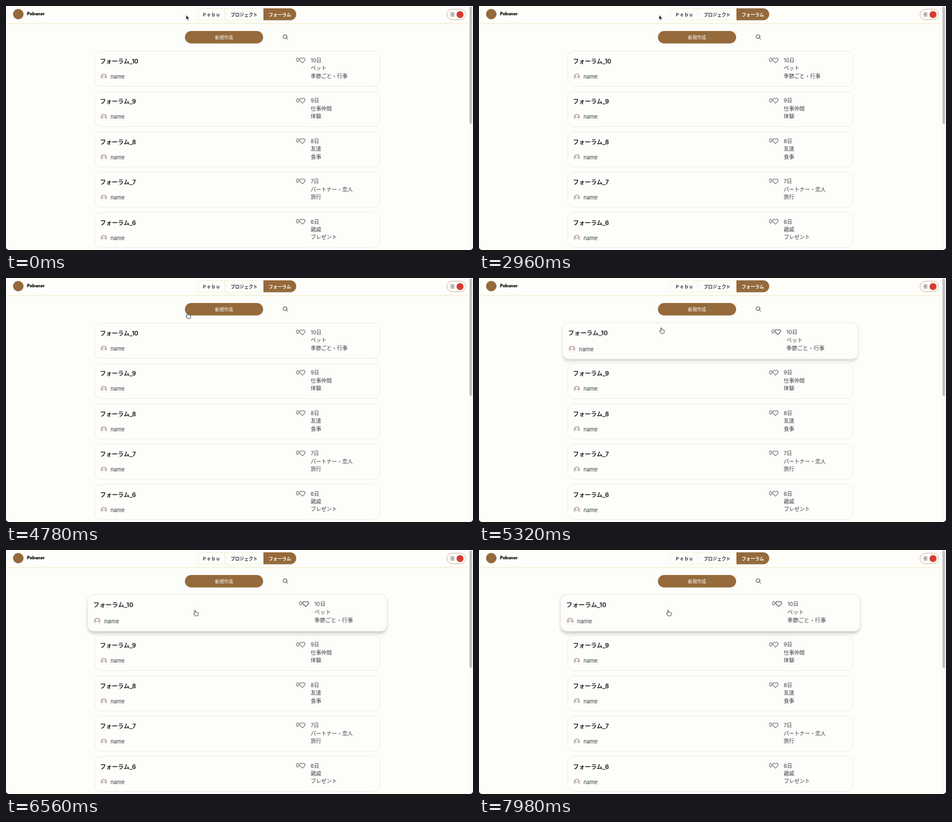
Animation of 800 by 420 pixels, one loop 8 s. Source, as an HTML page:

```html
<!DOCTYPE html>
<html lang="ja">
<head>
<meta charset="utf-8">
<title>Forum list</title>
<style>
  :root { --page: #fdfdfa; --ink: #3b3d45; --brown: #956a3c; --cream: #f4efd6; }
  html, body { margin: 0; width: 100%; height: 100%; overflow: hidden; background: var(--page); }
  svg { display: block; width: 800px; height: 420px; }
  text { font-family: Inter, "Noto Sans CJK JP", "Noto Sans CJK", sans-serif; fill: var(--ink); }
  .title { font-size: 10.2px; font-weight: 700; fill: #26272b; }
  .name { font-size: 9.3px; }
  .info { font-size: 9px; }
  .nav { font-size: 7.7px; font-weight: 600; text-anchor: middle; }
  .brand { font: 900 7.2px Inter, sans-serif; fill: #111; }
  .light { fill: #fff; }
  .page { fill: var(--page); }
  .brown { fill: var(--brown); }
  .rim { stroke: var(--cream); }
  .card { fill: var(--page); stroke: #ebeaf0; }
  .icon { fill: none; stroke: var(--ink); stroke-linecap: round; stroke-linejoin: round; }
  .pointer { stroke-linejoin: round; }
  #hover { transform-box: view-box; transform-origin: 396px 108px; }
</style>
</head>
<body>
<svg viewBox="0 0 800 420">
  <defs>
    <filter id="blur" x="-10%" y="-40%" width="120%" height="180%">
      <feGaussianBlur stdDeviation="2.5"/>
    </filter>
  </defs>

  <rect class="page" width="800" height="420"/>
  <rect y="29.5" width="793" height="1.5" fill="#f4efd6"/>

  <circle class="brown" cx="21" cy="14" r="9"/>
  <text class="brand" x="36" y="16">Pebuner</text>

  <rect class="page rim" x="327.5" y="4.5" width="170" height="20" rx="10"/>
  <path class="rim" d="M375 5V24"/>
  <path class="brown" d="M441 4H487a10.25 10.25 0 0 1 0 20.5H441Z"/>
  <text class="nav" x="351.5" y="17.5">Ｐｅｂｕ</text>
  <text class="nav" x="408" y="17.5">プロジェクト</text>
  <text class="nav light" x="469" y="17.5">フォーラム</text>

  <rect class="page" x="755.5" y="5.5" width="32" height="18" rx="9" stroke="#d6b49a"/>
  <path class="icon" d="M762 12H767.5M762 14.5H767.5M762 17H767.5" stroke-width=".9"/>
  <circle cx="777.8" cy="14.8" r="6" fill="#d93a30"/>

  <rect class="brown" x="306.5" y="43" width="134" height="21.5" rx="10.75"/>
  <text class="nav light" x="373.5" y="56.8" style="font-weight:500">新規作成</text>
  <g class="icon"><circle cx="478" cy="52.8" r="3.3"/><path d="M480.5 55.3L482.8 57.5"/></g>

  <g id="list"></g>
  <g id="hover"></g>

  <rect x="793" width="7" height="420" fill="#fafafa"/>
  <rect x="794" y="1" width="4.5" height="202" rx="2.25" fill="#c0c0c0"/>
  <path d="M0 415V420H5A5 5 0 0 1 0 415ZM800 415V420H795A5 5 0 0 0 800 415Z" fill="#111"/>

  <g id="cursor" class="pointer">
    <path id="arrow" d="M0 0V8.2L1.9 6.5L3.2 9.4L4.5 8.8L3.2 6H5.7Z"
      fill="#111" stroke="#fff" stroke-width=".6"/>
    <path id="hand" d="M-1 .9Q0 -.5 1 .9V3.6Q2 3 2.7 3.9Q3.8 3.3 4.3 4.3Q5.5 4 5.6 5.2V7.2Q5.5 8.6 4.7 9.8H-.2Q-1.6 8-2.9 6.2Q-2.8 4.9-1 6Z"
      fill="#f4f4f4" stroke="#222" stroke-width=".8"/>
  </g>
</svg>
<script>
  const LOOP = 8000;
  const start = document.timeline.currentTime || 0;
  const $ = id => document.getElementById(id);

  const cards = [
    ['10', 'ペット', '季節ごと・行事'],
    ['9', '仕事仲間', '体験'],
    ['8', '友達', '食事'],
    ['7', 'パートナー・恋人', '旅行'],
    ['6', '親戚', 'プレゼント'],
  ];

  const shadow = '<rect id="shadow" y="4" width="488" height="60.4" rx="10" fill="#000" filter="url(#blur)"/>';

  const card = ([day, group, topic], i) => `
    <g transform="translate(152 ${77.8 + i * 69.4})">
      ${i ? '' : shadow}
      <rect class="card" width="488.4" height="60.4" rx="10"/>
      <text class="title" x="9" y="21.2">フォーラム_${day}</text>
      <circle cx="15.6" cy="43.8" r="5.4" fill="#c6b6ae"/>
      <circle cx="15.6" cy="42.3" r="2" fill="#fff"/>
      <path d="M11.8 47.6Q12 45 15.6 45T19.4 47.6Q15.6 50.6 11.8 47.6Z" fill="#fff"/>
      <text class="name" x="27" y="47.2">name</text>
      <text class="info" x="344.8" y="18.4">0</text>
      <path class="icon" d="M355.8 20L351.9 16.2C349.6 13.6 353.2 9.6 355.8 12.8C358.4 9.6 362 13.6 359.7 16.2Z"/>
      <text class="info" x="370" y="19.2">${day}日</text>
      <text class="info" x="370" y="32.6">${group}</text>
      <text class="info" x="370" y="46">${topic}</text>
    </g>`;

  $('hover').innerHTML = card(cards[0], 0);
  $('list').innerHTML = cards.slice(1).map((c, i) => card(c, i + 1)).join('');

  // Steps are [time in ms, value, easing to the next step].
  const play = (id, prop, steps) => {
    const end = steps[steps.length - 1][1];
    const frames = [...steps, [LOOP, end]].map(([t, value, easing = 'linear']) =>
      ({ offset: t / LOOP, [prop]: value, easing }));
    $(id).animate(frames, { duration: LOOP, iterations: Infinity }).startTime = start;
  };

  const path = [
    [0, 308.5, 15.5], [3740, 308.5, 15.5], [3940, 309.5, 23.5], [5190, 311.6, 77.5],
    [5320, 312, 85.5], [5760, 323, 102], [6000, 324, 103.5],
  ];
  play('cursor', 'transform', path.map(([t, x, y]) => [t, `translate(${x}px, ${y}px)`]));

  // The hand shows over the button and over the first card.
  const swaps = [0, 4470, 4828, 5190];
  const toggle = first => swaps.map((t, i) => [t, (i % 2) ^ first, 'step-end']);
  play('arrow', 'opacity', toggle(1));
  play('hand', 'opacity', toggle(0));

  const rise = (from, to) => [[0, from], [5190, from, 'ease'], [5490, to]];
  play('hover', 'transform', rise('scale(1)', 'scale(1.05)'));
  play('shadow', 'opacity', rise(0, .2));
</script>
</body>
</html>
```
